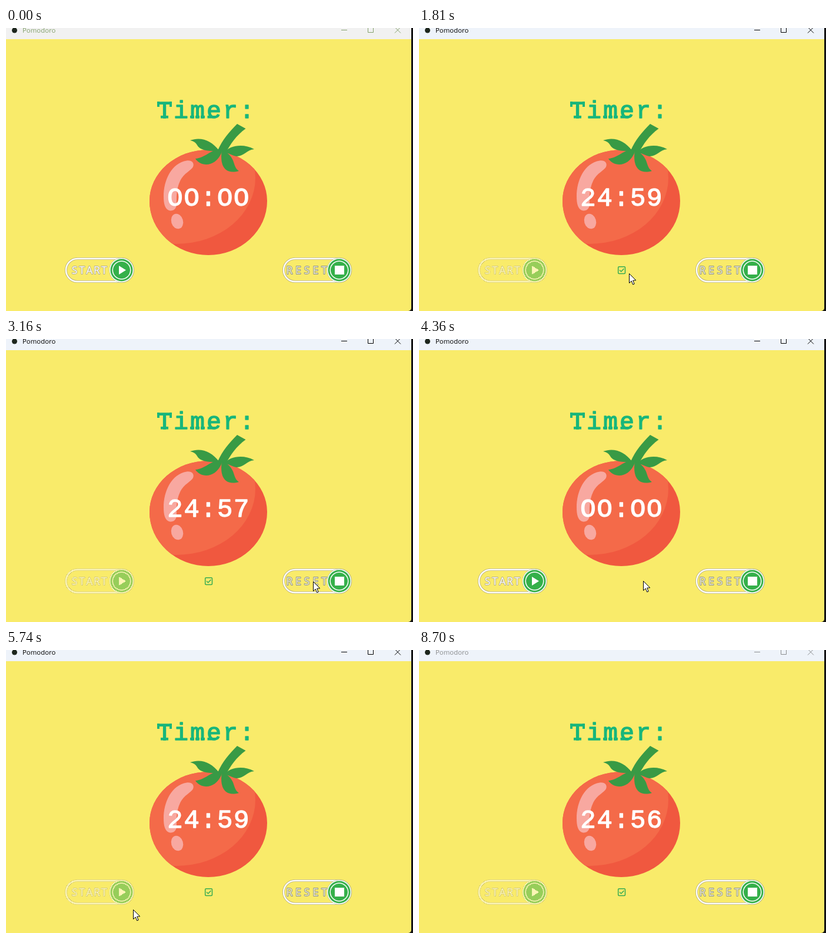
An HTML page with a canvas that plays this animation: 692x481 px, repeating every 8.77 s.

```html
<!DOCTYPE html>
<html lang="en">
<head>
<meta charset="utf-8">
<title>Pomodoro</title>
<style>
html, body { margin: 0; width: 100%; height: 100%; overflow: hidden; background: #f9eb6a; }
canvas { display: block; }
</style>
</head>
<body>
<canvas id="stage" width="692" height="481"></canvas>
<script>
const ctx = document.getElementById('stage').getContext('2d');
const LOOP = 8770, TICK = 1010;
const START = 870, RESET = 3960, RESTART = 5000, LEAVE = 8700;
const YELLOW = '#f9eb6a', GREEN = '#35b04a', LEAF = '#389a45', SHINE = '#f8a8a0';
const MONO = '"Liberation Mono", monospace';

// Each glide continues from where the pointer last rested.
const glides = [];
let rest = [300, 474];
function glide(begin, end, steps, to, bend) {
  const from = rest;
  bend = bend || [0, 1].map(k => (from[k] + to[k]) / 2);
  glides.push({ begin, end, steps, from, to, bend });
  rest = to;
}
glide(460, 1070, 10, [188, 412], [205, 445]);
glide(1540, 1880, 6, [372, 417]);
glide(2030, 2160, 3, [341, 413]);
glide(2690, 3160, 7, [522, 412]);
glide(4290, 4520, 4, [200, 410]);
glide(5400, 5740, 6, [216, 441], [148, 436]);
glide(5810, 6220, 7, [622, 453]);
glide(6290, 6290, 1, [628, 453]);
glide(7700, 7770, 2, [631, 455]);

function pointerAt(t) {
  if (t < glides[0].begin || t >= LEAVE) return null;
  const g = glides.filter(m => m.begin <= t).pop();
  const last = g.steps - 1;
  const i = t >= g.end ? last : Math.floor((t - g.begin + 6) / (g.end - g.begin) * last);
  const u = (i + 0.7) / (last + 0.7);
  const s = u * u * (3 - 2 * u);
  return [0, 1].map(k => Math.round(
    (1 - s) ** 2 * g.from[k] + 2 * s * (1 - s) * g.bend[k] + s * s * g.to[k]));
}

const isRunning = t => t >= RESTART || (t >= START && t < RESET);

function clockAt(t) {
  if (!isRunning(t)) return '00:00';
  const begin = t >= RESTART ? RESTART : START;
  return '24:' + (59 - Math.floor((t - begin) / TICK));
}

function fill(path, color) {
  ctx.fillStyle = color;
  ctx.fill(new Path2D(path));
}

function oval(x, y, rx, ry, color, turn = 0) {
  ctx.beginPath();
  ctx.ellipse(x, y, rx, ry, turn, 0, 2 * Math.PI);
  ctx.fillStyle = color;
  ctx.fill();
}

function spaced(text, x, y, pitch, weight) {
  ctx.textAlign = 'center';
  ctx.lineJoin = 'round';
  ctx.lineWidth = weight;
  [...text].forEach((c, i) => {
    ctx.strokeText(c, x + i * pitch, y);
    ctx.fillText(c, x + i * pitch, y);
  });
}

// Half-tone veil laid over a disabled button.
const veil = (() => {
  const tile = document.createElement('canvas');
  tile.width = tile.height = 2;
  const g = tile.getContext('2d');
  g.fillStyle = YELLOW;
  g.fillRect(0, 0, 1, 1);
  g.fillRect(1, 1, 1, 1);
  return ctx.createPattern(tile, 'repeat');
})();

function titleBar(t) {
  const early = t < glides[0].begin;
  const active = t >= START - 70 && t < LEAVE;
  const ink = active ? '#000' : early ? '#83a06c' : '#8b8d8f';
  ctx.fillStyle = early ? '#f1f1f1' : '#eef3fa';
  ctx.fillRect(0, 0, 690, 19);
  oval(14.5, 4, 4.5, 4.5, '#1d261d');
  ctx.textAlign = 'left';
  ctx.font = '11.4px "Open Sans", sans-serif';
  ctx.fillStyle = ctx.strokeStyle = ink;
  ctx.fillText('Pomodoro', 28, 8);
  ctx.lineWidth = 1;
  ctx.stroke(new Path2D('M570 3.5h10M661 -1.5l10 10M671 -1.5l-10 10M615.5 -1.5h9v9h-9z'));
}

function heading() {
  const x = 269.5, base = 153, pitch = 28;
  const foot = (i, dx, w) => ctx.fillRect(x + i * pitch + dx - w / 2, base - 4, w, 4.5);
  ctx.font = '41px ' + MONO;
  ctx.fillStyle = ctx.strokeStyle = '#17b67b';
  spaced('Timer:', x, base, pitch, 1.5);
  // slab ends on T, m and r
  foot(0, 0, 13);
  foot(3, -4, 14);
  for (const side of [-1, 0, 1]) foot(2, side * 9, 7);
  for (const side of [-1, 1]) ctx.fillRect(x + side * 10.5 - 2, 125, 4, 9);
}

function tomato() {
  ctx.save();
  ctx.beginPath();
  ctx.ellipse(344, 294, 100, 87, 0, Math.PI, 2 * Math.PI);
  ctx.ellipse(344, 294, 100, 92, 0, 0, Math.PI);
  ctx.fillStyle = '#f0583f';
  ctx.fill();
  ctx.clip();
  oval(290, 255, 134, 112, '#f46a49');
  ctx.restore();
  fill('M307 225.5C315 224 321 229 318 236C314 243 303 246 296 260C289 275 290 289 290 299C290 307 285 311 279 310.5C270 309 268 298 268 286C268 259 281 230 307 225.5Z', SHINE);
  oval(291, 328.5, 10, 13, SHINE, -0.28);
  fill('M393 163L407.5 171C391 183 382 197 373 213L360 208C368 190 379 177 393 163Z', LEAF);
  fill('M313 191C332 184 350 192 362 208C344 211 329 207 325 199C322 194 318 192 313 191Z', LEAF);
  fill('M363 206C348 207 338 221 322 222C330 235 355 239 367 211Z', LEAF);
  fill('M367 208C364 226 367 251 396 243C385 236 391 222 374 211Z', LEAF);
  fill('M371 212C380 199 404 196 422 206C409 207 404 219 391 218C383 216 378 212 371 212Z', LEAF);
}

function clock(text) {
  ctx.fillStyle = ctx.strokeStyle = '#fff';
  ctx.font = '44px ' + MONO;
  // the plain round zero has no inner dot
  spaced(text.replace(/0/g, 'O'), 287.5, 302, 28.2, 1.3);
}

function button(x, text, textX, pitch, face, edge, icon, down) {
  ctx.save();
  if (down) ctx.translate(1, 1);
  for (const [color, width] of [['#b9b07c', 4], ['#fff', 2.4]]) {
    ctx.beginPath();
    ctx.roundRect(x + 2, 392, 114, 39, 19.5);
    ctx.strokeStyle = color;
    ctx.lineWidth = width;
    ctx.stroke();
  }
  ctx.font = '17.5px "Open Sans", sans-serif';
  ctx.fillStyle = face;
  ctx.strokeStyle = edge;
  spaced(text, textX, 417.5, pitch, 1.8);
  const ring = (r, color) => oval(x + 96.5, 411.5, r, r, color);
  ring(21, '#a9b98a');
  ring(20.5, '#fff');
  ring(19, GREEN);
  ring(16, '#fff');
  ring(14.5, GREEN);
  fill(icon, '#fff');
  ctx.restore();
}

function tick() {
  ctx.strokeStyle = '#35ab52';
  ctx.lineWidth = 1.5;
  ctx.beginPath();
  ctx.roundRect(338.7, 405.7, 11.8, 11.8, 1.5);
  ctx.stroke();
  ctx.stroke(new Path2D('M341 411.5l2.7 2.5l4.8 -5'));
}

function pointer([x, y]) {
  ctx.save();
  ctx.translate(x + 0.5, y + 0.5);
  const arrow = 'M0 0V16L3.7 12.5L6.2 18.5L8.7 17.5L6.2 11.6L11.3 11.3Z';
  fill(arrow, '#fff');
  ctx.strokeStyle = '#000';
  ctx.lineWidth = 1;
  ctx.stroke(new Path2D(arrow));
  ctx.restore();
}

function draw(t) {
  const running = isRunning(t);
  const pressing = at => t >= at - 70 && t < at;
  ctx.fillStyle = '#141414';
  ctx.fillRect(0, 0, 692, 481);
  ctx.save();
  ctx.beginPath();
  ctx.roundRect(-10, -10, 699, 491, 5);
  ctx.clip();
  ctx.fillStyle = YELLOW;
  ctx.fillRect(0, 0, 692, 481);
  titleBar(t);
  ctx.restore();
  heading();
  tomato();
  clock(clockAt(t));
  button(100, 'START', 116.5, 12.6, '#fff', '#b3ac8c',
    'M192 404L204 411.5L192 419Z', pressing(START) || pressing(RESTART));
  button(470, 'RESET', 482, 14.8, '#f0ecd0', '#8f9485',
    'M559 404h16v15h-16z', pressing(RESET));
  if (running) {
    ctx.fillStyle = veil;
    ctx.fillRect(98, 388, 122, 47);
    tick();
  }
  const at = pointerAt(t);
  if (at) pointer(at);
}

const begin = performance.now();
function loop() {
  draw((performance.now() - begin) % LOOP);
  requestAnimationFrame(loop);
}
loop();
</script>
</body>
</html>
```
